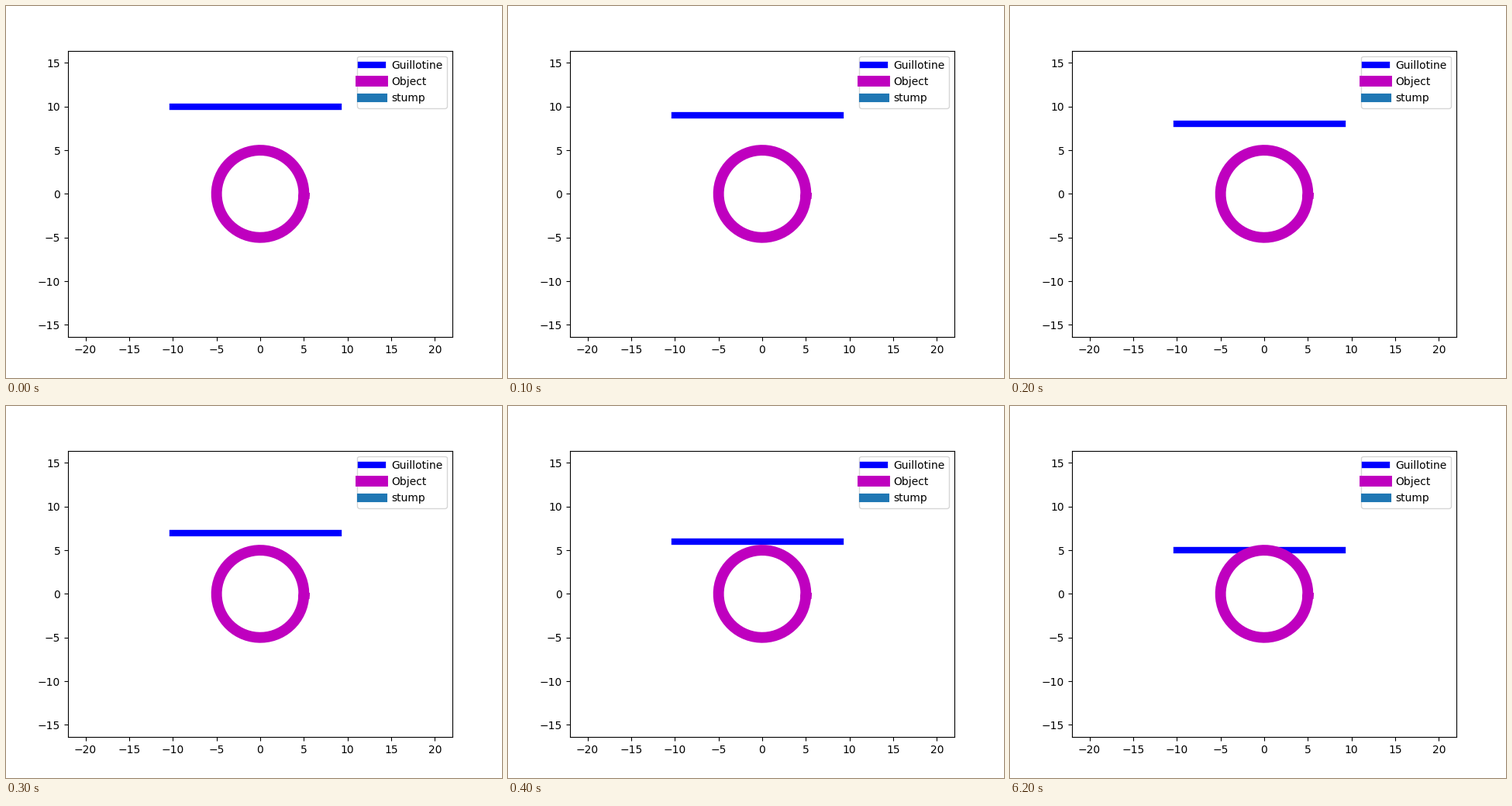
Recreate the animation shown at these times as a matplotlib script. Size 640 px wide and 480 px high, loop 10 s.

```python
import numpy as np
import matplotlib.pyplot as plt
from matplotlib.animation import FuncAnimation

START, STOP = 10, 5      # blade height before and after the fall
FRAMES, INTERVAL = 100, 100

fig, ax = plt.subplots(figsize=(6.4, 4.8), dpi=100)
ax.set_xlim(-22, 22)
ax.set_ylim(-16.4, 16.4)

blade_x = np.arange(-10, 10)
theta = np.arange(0, 2 * np.pi, 0.1)

blade, = ax.plot(blade_x, np.full(blade_x.size, START), "b", lw=6, label="Guillotine")
ax.plot(5 * np.cos(theta), 5 * np.sin(theta), "m", lw=10, label="Object")
ax.plot([], [], color="tab:blue", lw=8, label="stump")
ax.legend(loc="upper right")


def update(i):
    height = max(START - i, STOP)
    blade.set_ydata(np.full(blade_x.size, height))
    return blade,


anim = FuncAnimation(fig, update, frames=FRAMES, interval=INTERVAL,
                     repeat=True, repeat_delay=0)
plt.show()
```
